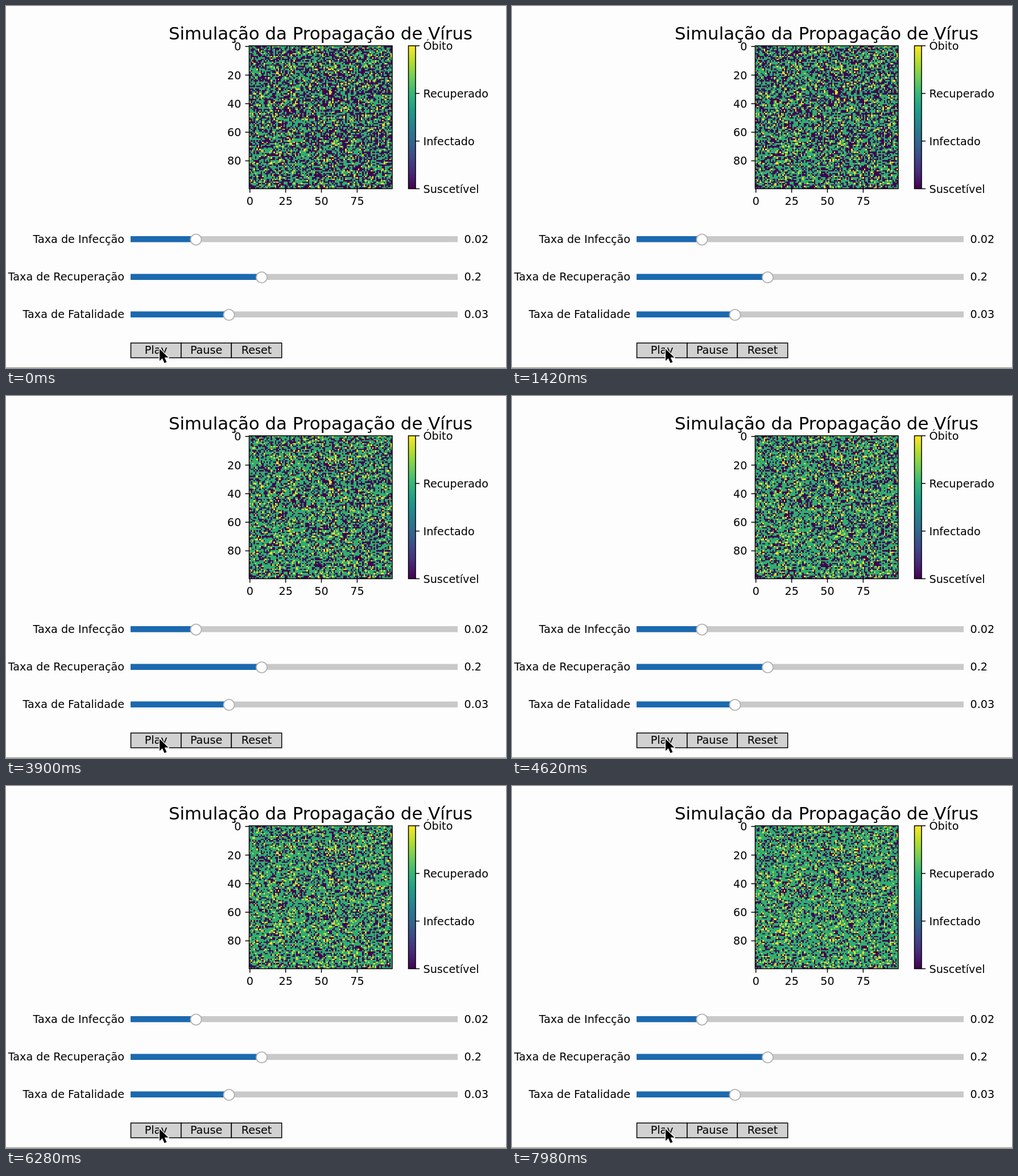
An HTML page with a canvas for the animation above (8000 ms loop, 879 by 637 pixels).

```html
<!DOCTYPE html>
<html lang="pt">
<head>
<meta charset="utf-8">
<title>Simulação da Propagação de Vírus</title>
<style>
  html, body { margin: 0; width: 100%; height: 100%; overflow: hidden; background: #fdfdfd; }
  canvas { display: block; }
</style>
</head>
<body>
<canvas id="stage" width="879" height="637"></canvas>
<script>
const ctx = document.getElementById('stage').getContext('2d');
const LOOP = 8000, SIZE = 100, LAST_STEP = 172;
const PLOT = { x: 427.5, y: 70, side: 251.5 };
const CELL = PLOT.side / SIZE;
const STATE_COLORS = ['#3f0350', '#31688e', '#30ad70', '#f4e122'];
const VIRIDIS = ['#440154', '#482878', '#3e4989', '#31688e', '#26828e', '#1f9e89', '#35b779', '#6ece58', '#b5de2b', '#fde725'];

function seededRandom(seed) {
  return () => {
    seed = (seed + 0x6d2b79f5) | 0;
    let n = Math.imul(seed ^ (seed >>> 15), 1 | seed);
    n = (n + Math.imul(n ^ (n >>> 7), 61 | n)) ^ n;
    return ((n ^ (n >>> 14)) >>> 0) / 4294967296;
  };
}

// Each cell has a step of infection, a step of removal and an outcome.
const random = seededRandom(20);
const cells = Array.from({ length: SIZE * SIZE }, () => {
  const infected = 2 * LAST_STEP * Math.log(0.46 / (random() + 1e-9));
  const removed = infected + Math.ceil(Math.log(1 - random()) / Math.log(0.77));
  return { infected, removed, outcome: random() < 0.13 ? 3 : 2 };
});

function stepAt(time) {
  const shifted = time + 20;
  const burst = Math.floor(shifted / 840);
  return burst * 18 + Math.min(17, Math.floor((shifted % 840) / 43.5));
}

function rect(x, y, w, h, color) {
  ctx.fillStyle = color;
  ctx.fillRect(x, y, w, h);
}

function frame(x, y, w, h) {
  ctx.strokeStyle = '#000';
  ctx.lineWidth = 1.5;
  ctx.strokeRect(x, y, w, h);
}

function label(text, x, y, align, size = 19.2) {
  ctx.font = `${size}px "DejaVu Sans", sans-serif`;
  ctx.textAlign = align;
  ctx.fillStyle = '#000';
  ctx.fillText(text, x, y);
}

function drawCells(step) {
  cells.forEach(({ infected, removed, outcome }, i) => {
    const col = i % SIZE, row = Math.floor(i / SIZE);
    const x = Math.round(PLOT.x + col * CELL), y = Math.round(PLOT.y + row * CELL);
    const state = step < infected ? 0 : step < removed ? 1 : outcome;
    rect(x, y, Math.round(PLOT.x + (col + 1) * CELL) - x,
      Math.round(PLOT.y + (row + 1) * CELL) - y, STATE_COLORS[state]);
  });
}

function drawAxes() {
  frame(PLOT.x, PLOT.y, PLOT.side, PLOT.side);
  for (let v = 0; v < 100; v += 20) {
    const y = PLOT.y + (v + 0.5) * CELL;
    rect(PLOT.x - 7, y - 0.75, 7, 1.5, '#000');
    label(v, 413.5, y + 7, 'right');
  }
  for (let v = 0; v < 100; v += 25) {
    const x = PLOT.x + (v + 0.5) * CELL;
    rect(x - 0.75, PLOT.y + PLOT.side, 1.5, 7, '#000');
    label(v, x, 350, 'center');
  }
  label('Simulação da Propagação de Vírus', 553, 59, 'center', 30.8);
}

function drawColorbar() {
  const gradient = ctx.createLinearGradient(0, PLOT.y + PLOT.side, 0, PLOT.y);
  VIRIDIS.forEach((color, i) => gradient.addColorStop(i / 9, color));
  rect(707.5, PLOT.y, 12.5, PLOT.side, gradient);
  frame(707.5, PLOT.y, 12.5, PLOT.side);
  ['Óbito', 'Recuperado', 'Infectado', 'Suscetível'].forEach((name, i) => {
    const y = PLOT.y + i * PLOT.side / 3;
    rect(720, y - 0.75, 7, 1.5, '#000');
    label(name, 733.5, y + 7.3, 'left');
  });
}

function drawSlider(name, value, y, knob) {
  rect(219, y - 5.5, 575, 10.5, '#c9c9c9');
  rect(219, y - 5.5, knob - 219, 10.5, '#1b69af');
  ctx.beginPath();
  ctx.arc(knob, y + 0.5, 9.6, 0, 2 * Math.PI);
  ctx.fillStyle = '#fdfdfd';
  ctx.fill();
  ctx.strokeStyle = '#b4b4b4';
  ctx.lineWidth = 1.9;
  ctx.stroke();
  label(name, 208, y + 6.3, 'right');
  label(value, 805.5, y + 6.3, 'left');
}

function drawButton(name, i) {
  const x = 219.5 + i * 88.4;
  rect(x, 593, 88.4, 26, '#d1d1d1');
  frame(x, 593, 88.4, 26);
  label(name, x + 44.2, 612, 'center');
}

function drawCursor() {
  const arrow = new Path2D('M270 603.5V624.5L274.8 620L278.6 628.2L282.4 626.5L278.7 618.6H285.5Z');
  ctx.strokeStyle = '#fff';
  ctx.lineWidth = 2.6;
  ctx.lineJoin = 'round';
  ctx.stroke(arrow);
  ctx.lineJoin = 'miter';
  ctx.fillStyle = '#000';
  ctx.fill(arrow);
}

function draw(time) {
  rect(0, 0, 879, 637, '#fdfdfd');
  drawCells(stepAt(time));
  drawAxes();
  drawColorbar();
  drawSlider('Taxa de Infecção', '0.02', 410.5, 334);
  drawSlider('Taxa de Recuperação', '0.2', 477, 449.5);
  drawSlider('Taxa de Fatalidade', '0.03', 543, 392);
  ['Play', 'Pause', 'Reset'].forEach(drawButton);
  drawCursor();
  rect(0, 636, 879, 1, '#8f8d78');
}

const start = performance.now();
function tick() {
  draw((performance.now() - start) % LOOP);
  requestAnimationFrame(tick);
}
tick();
</script>
</body>
</html>
```
